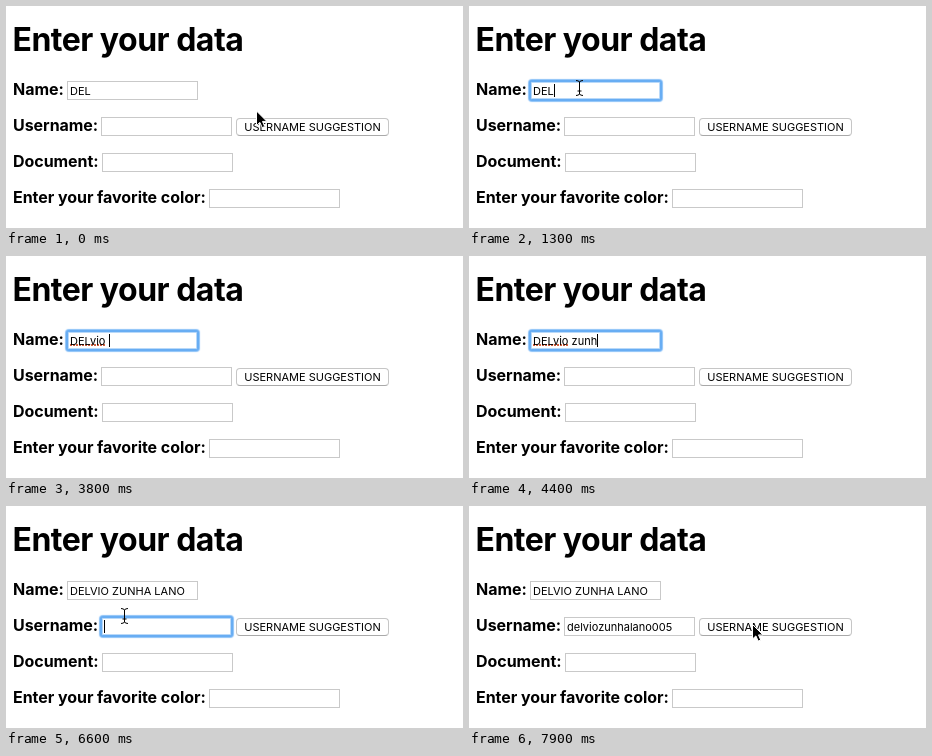
These frames come from a looping animation (457 px wide and 222 px high, 8 s). An HTML page:

```html
<!DOCTYPE html>
<html lang="en">
<head>
<meta charset="utf-8">
<title>Enter your data</title>
<style>
  html, body { margin: 0; width: 100%; height: 100%; overflow: hidden; background: #fff; }
  body { position: relative; color: #000; font: 11px/13px Inter, "Open Sans", sans-serif; }
  body > * { position: absolute; margin: 0; box-sizing: border-box; white-space: pre; }
  h1 { left: 6.5px; top: 14px; font-size: 32px; line-height: 40px; letter-spacing: -.016em; }
  label { left: 7px; font-size: 16px; font-weight: 700; line-height: 20px; letter-spacing: -.003em; }
  .field { width: 131px; height: 19px; padding: 3px 2px 1px; border: 1px solid #c9c9c9; background: #fff; }
  .focus { border-color: #68adf3; border-radius: 2px;
    box-shadow: 0 0 0 1px #68adf3, 0 0 1px 2px #8cc2f8, inset 0 0 0 1px #b9d9f9; }
  .caret { display: inline-block; position: relative; top: -1px; width: 0; height: 13px; margin-right: -1px;
    border-left: 1px solid #000; vertical-align: top; }
  .misspelt { background: linear-gradient(90deg, #d2603f 2px, transparent 0) 0 calc(100% - 2px) / 3px 2px repeat-x; }
  .button { left: 230px; top: 112px; width: 153px; height: 18px; border: 1px solid #c6c6c6; border-bottom-color: #a9a9a9;
    border-radius: 4px; background: #fff; line-height: 16px; text-align: center; }
  svg { left: 0; top: 0; overflow: visible; }
</style>
</head>
<body>
<h1>Enter your data</h1>
<label style="top:73px">Name:</label>
<label style="top:109px">Username:</label>
<label style="top:145px">Document:</label>
<label style="top:181px">Enter your favorite color:</label>
<div class="field" id="name" style="left:61px;top:75px"></div>
<div class="field" id="user" style="left:95px;top:111px"></div>
<div class="field" style="left:96px;top:147px"></div>
<div class="field" style="left:203px;top:183px"></div>
<div class="button">USERNAME SUGGESTION</div>
<svg id="pointer" width="1" height="1">
  <path id="arrow" d="M0 0V14.5L3.4 11.4L5.7 16.6L8.2 15.5L6 10.4H10.4Z" fill="#000" stroke="#fff"/>
  <g id="beam" fill="none" stroke-linecap="square">
    <path id="beam-shape" d="M-3 -7.5Q0 -7.5 0 -5.5Q0 -7.5 3 -7.5M0 -5.5V5.5M-3 7.5Q0 7.5 0 5.5Q0 7.5 3 7.5M-1.5 3H1.5" stroke="#000"/>
  </g>
</svg>
<script>
const LOOP = 8000, TICK = 100;
const WORDS = ['DELvio', 'zunha', 'lano'];
const FULL_NAME = WORDS.join(' ');
const START_LENGTH = 3;
const KEY_TIMES = [2800, 2900, 3000, 3700, 4000, 4100, 4300, 4400, 4500, 4700, 4900, 5000, 5200, 5300];
const CARET_OFF = [[1800, 2300], [3500, 3700], [6100, 6600], [7100, 7600]];
const NAME_FOCUS = 1300, USER_FOCUS = 5600, BLUR = 7600, FILL = 7700;
const MOVES = [
  { start: 500, end: 1100, from: [250.5, 105], to: [110.5, 82] },
  { start: 6600, end: 7400, from: [118.5, 110], to: [283.5, 118.5] }
];

const $ = id => document.getElementById(id);
const within = (t, [a, b]) => t >= a && t < b;
const ease = p => p * p * (3 - 2 * p);
const caret = '<span class="caret"></span>';

function typedName(t) {
  let left = START_LENGTH + KEY_TIMES.filter(k => k <= t).length;
  return WORDS.map((word, i) => {
    const part = word.slice(0, Math.max(0, left));
    const finished = left > word.length;
    left -= word.length + 1;
    return finished ? `<span class="misspelt">${part}</span> ` : part;
  }).join('');
}

function setField(el, html, focused, showCaret) {
  const content = html + (focused && showCaret ? caret : '');
  el.classList.toggle('focus', focused);
  if (el.content !== content) el.innerHTML = el.content = content;
}

function drawPointer(t) {
  const move = MOVES[t < USER_FOCUS ? 0 : 1];
  const p = ease(Math.min(1, Math.max(0, (t - move.start) / (move.end - move.start))));
  const [x, y] = move.from.map((v, i) => v + (move.to[i] - v) * p);
  const overName = x > 61 && x < 192 && y > 75 && y < 94;
  const overUser = x > 95 && x < 226 && y >= 110 && y < 130;
  const overText = overName || overUser;
  $('pointer').style.display = within(t, [KEY_TIMES[0], MOVES[1].start]) ? 'none' : '';
  $('pointer').style.transform = `translate(${x}px, ${y}px)`;
  $('arrow').style.display = overText ? 'none' : '';
  $('beam').style.display = overText ? '' : 'none';
}

function draw(now) {
  const t = Math.floor(now % LOOP / TICK) * TICK;
  const showCaret = !CARET_OFF.some(span => within(t, span));
  const name = t < USER_FOCUS ? typedName(t) : FULL_NAME.toUpperCase();
  const user = t < FILL ? '' : FULL_NAME.toLowerCase().replaceAll(' ', '') + '005';
  setField($('name'), name, within(t, [NAME_FOCUS, USER_FOCUS]), showCaret);
  setField($('user'), user, within(t, [USER_FOCUS, BLUR]), showCaret);
  drawPointer(t);
}

let origin;
function frame() {
  const now = performance.now();
  origin ??= now;
  draw(now - origin);
  requestAnimationFrame(frame);
}
frame();
</script>
</body>
</html>
```
